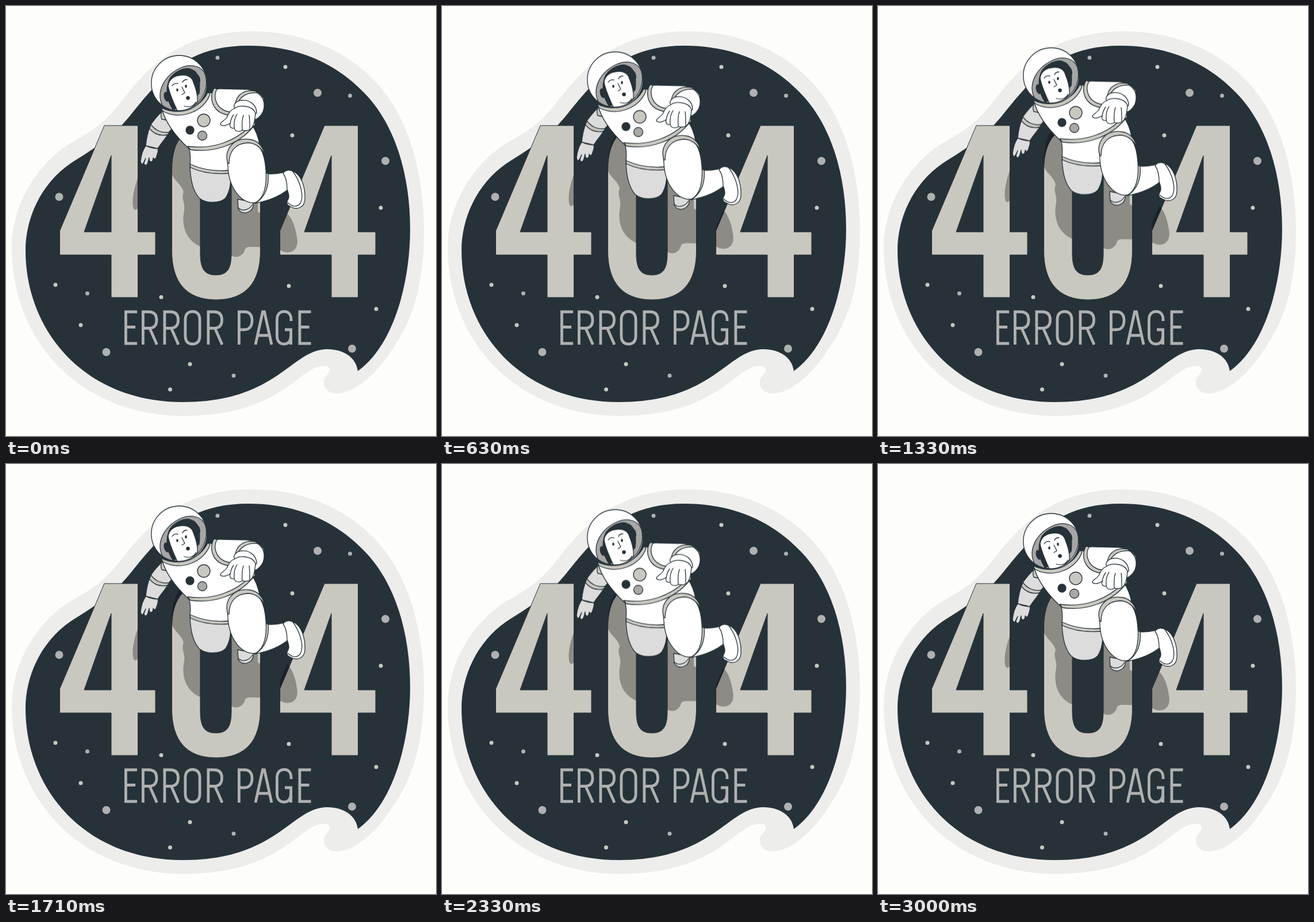
Animation, 748 px wide and 748 px high, one loop 3040 ms. Source, as an HTML page:

```html
<!DOCTYPE html>
<html lang="en">
<head>
<meta charset="utf-8">
<title>404 error page</title>
<style>
  html, body { margin: 0; width: 100%; height: 100%; overflow: hidden; background: #fdfef9; }
  svg { display: block; width: 100vw; height: 100vh; }
  .ink { fill: #263238; }
  .beige { fill: #c9c8c0; }
  .pale { fill: #dcdcdc; }
  .line { fill: none; }
  .stars { fill: none; stroke: #c9c8c0; stroke-width: 7; stroke-linecap: round; }
  .grey { stroke: #b0b0b0; }
  .big { stroke-width: 14; }
  .lettering { fill: none; stroke: #b0b0b0; stroke-width: 4.8; }
  .suit { fill: #fff; stroke: #263238; stroke-width: 1.3; stroke-linejoin: round; stroke-linecap: round; }
  /* 24 steps a second: 1.5 s up, 1.5 s down, then one held step */
  .float { animation: float 3040ms -8ms infinite steps(36); }
  @keyframes float {
    0%, 98.684%, 100% { transform: translateY(0); }
    49.342% { transform: translateY(-15px); }
  }
</style>
</head>
<body>
<svg viewBox="0 0 748 748">
  <defs>
    <path id="digits" fill-rule="evenodd" clip-rule="evenodd" d="
      M171 208H229.500V393H260V433H229.500V507H183V433H93.500V391ZM183 260L136 393H183Z
      M554 208H612.500V393H643V433H612.500V507H566V433H476.500V391ZM566 260L519 393H566Z
      M288.500 285C288.500 232 312 204 365 204S442.500 232 442.500 285V426C442.500 482 416 511 365.500 511S288.500 482 288.500 426Z
      M338 285V430C338 457 345 468 365 468S392 457 392 430V285C392 258 385 247 365 247S338 258 338 285Z"/>
    <clipPath id="onDigits"><use href="#digits"/></clipPath>
    <path id="E" d="M22 2H2.400V57H22M2.400 28.500H19"/>
    <path id="R" d="M2.400 59V2H12C22 2 26 7 26 16S22 30.500 12 30.500H2.400M14 30.500L26.500 59"/>
    <path id="O" d="M2.400 16C2.400 7 6.500 1.500 15 1.500S27.600 7 27.600 16V43C27.600 53 23.500 58 15 58S2.400 53 2.400 43Z"/>
    <path id="P" d="M2.400 59V2H12C21 2 25 8 25 17S21 33 12 33H2.400"/>
    <path id="A" d="M2.500 59L15 2H18L30.500 59M6.500 43H26.500"/>
    <path id="G" d="M27 18V16C27 7 23 1.500 15 1.500S2.400 7 2.400 16V43C2.400 53 7 58 14.500 58C23 58 26.600 52 26.600 42V33H16M26.600 40V59"/>
  </defs>

  <!-- backdrop -->
  <path fill="#ededec" d="M428 44C520 44 600 80 652 142C705 205 727 300 727 390C727 480 710 545 670 600C645 640 605 674 576 674C555 674 548 656 556 645C566 634 566 626 552 626C510 626 480 713 310 713C126 713 10 580 10 420C10 350 50 278 110 240C150 217 165 208 193 176C245 108 300 44 428 44Z"/>
  <path class="ink" d="M422 69C502 69 571 97 622 150C680 208 703 300 703 388C703 480 675 590 612 635C609 610 585 596 556 597C495 600 470 689 308 689C136 689 34 565 34 425C34 370 60 310 112 274C160 243 185 230 222 183C275 117 320 69 422 69Z"/>
  <path class="stars" d="M486 106h0M498 225h0M652 351h0M86 485h0M130 555h0M320 623h0M285.500 667h0M270 506.500h0M492 487h0M644 527h0"/>
  <path class="stars grey" d="M368 90h0M598.500 156h0M141.500 500h0M396 643h0"/>
  <path class="stars grey big" d="M542 151h0M660 269.500h0M92.500 332h0M174.500 602h0M602 596h0"/>

  <use href="#digits" class="beige" stroke="#263238"/>
  <g class="lettering" role="img" aria-label="ERROR PAGE" transform="translate(0 530)">
    <use href="#E" x="206"/><use href="#R" x="236"/><use href="#R" x="273.500"/>
    <use href="#O" x="309.500"/><use href="#R" x="349.500"/>
    <use href="#P" x="403"/><use href="#A" x="431.500"/><use href="#G" x="469"/><use href="#E" x="508.500"/>
  </g>

  <g class="float">
    <!-- shadow, cut to the digits at rest -->
    <path clip-path="url(#onDigits)" opacity=".3" d="
      M288 225V291C292 304 306 310 309 324C304 335 312 342 310 355C304 385 315 410 340 419L392 434C402 440 413 434 416 423C418 417 430 420 445 419V362L438 358V225Z
      M476 330V424C490 434 510 428 506.500 405C504 385 497 364 484 358Z
      M232 293C222 315 217 345 223 354C228 356 231 350 232 344Z"/>

    <g class="suit">
      <!-- far foot, arm and leg -->
      <path class="pale" d="M403 336L404 353C408 360 416 362 424 357C430 353 431 347 430 341Z"/>
      <path class="line" d="M404 351C411 358 423 355 429 345"/>
      <path class="pale" d="M276 180C268 186 259 196 252 206C246 220 244 232 243 243L264 248C270 238 280 228 284 219L294 207Z"/>
      <path class="pale" d="M243 243C238 250 235 260 234 270C235 276 238 277 240 271L243 265L240 273C241 279 245 278 247 272L249 264C249 268 250 271 252 271C255 271 256 268 256 264C258 267 260 267 261 264C263 258 266 252 264 248C257 248 249 246 243 243Z"/>
      <path class="beige" d="M252 206C260 217 272 222 285 219L281 224C268 227 257 222 249.500 213Z"/>
      <path class="beige" d="M274 177C269 186 269 193 271 197C278 197 286 202 291 208L294 204Z"/>
      <path class="pale" d="M320 279C321 300 324 320 336 334C348 344 372 344 382 334C390 322 392 305 390 288Z"/>

      <!-- torso -->
      <path d="M318 246C321 256 321 268 320 276C340 286 366 288 390 286L441 240C438 224 433 214 428 207Z"/>
      <path class="beige" d="M320 275C342 285 366 288 388 286L389 291C364 293 340 290 321 281Z"/>
      <path d="M271 178C276 198 290 222 318 248C360 252 405 236 433 207L432 170L352 150C340 172 300 192 271 178Z"/>
      <path class="beige" d="M316 244C358 250 400 236 427 206L430 210C404 242 360 256 321 250Z"/>
      <path class="beige" d="M270 177C300 192 338 178 351 150L355 153C345 184 302 200 273 183Z"/>
      <circle class="ink" cx="320" cy="216" r="7"/>
      <circle class="beige" cx="344" cy="199" r="11"/>
      <circle fill="#a8a8a5" cx="341.500" cy="225.500" r="8"/>

      <!-- near leg -->
      <path d="M448 292C464 292 478 292 486 288L492 318C480 328 462 338 434 343Z"/>
      <path class="beige" d="M451 291H456C458 312 452 332 434 343L428 342C445 330 453 312 451 291Z"/>
      <path d="M482 291C486 284 494 285 500 288C514 294 521 316 520 336C519 352 505 355 495 349C488 346 487 342 491 336C494 330 490 322 489 319C489 308 487 298 482 291Z"/>
      <path class="line" d="M499 288C512 305 519 330 512 343C506 351 498 349 490 342"/>
      <path d="M385 268C384 245 398 233 420 234C441 235 450 255 452 285C454 310 450 334 434 342C412 345 388 320 386 280Z"/>
      <path class="beige" d="M386 274C378 248 398 228 424 232C438 234 447 244 451 260C444 246 434 238 420 238C400 239 388 252 388 274Z"/>

      <!-- near arm -->
      <path d="M358 160C358 148 364 143 376 144L420 145C434 147 444 152 449 162L440 190H400C378 186 362 178 358 160Z"/>
      <path class="beige" d="M362 143C352 158 358 188 391 190L393 185C366 182 359 160 367 144Z"/>
      <path class="beige" d="M399 169C402 154 414 145 434 148L438 151C420 151 408 158 404 169Z"/>
      <path d="M403 169C408 157 420 150 437 151C448 158 452 170 447 184C443 192 438 196 433 198L430 182C420 176 410 176 400 180Z"/>
      <path d="M398 179C394 172 400 165 410 164C424 163 436 172 436 186L432 190Z"/>
      <path d="M398 178C405 172 428 172 434 186C433 200 430 212 424 215C418 218 412 216 412 216C404 220 398 218 397 212C392 214 388 210 390 204C384 208 376 210 373 206C372 202 380 200 384 194C388 184 392 180 398 178Z"/>
      <path class="line" d="M390 204C391 198 393 193 396 189M397 212C396 202 398 194 402 188M411 216C410 204 411 196 413 190M424 214C424 204 424 198 423 190"/>

      <!-- helmet and face -->
      <circle cx="301.300" cy="134.500" r="48.500"/>
      <path fill="#a6a6a6" d="M272 173C261 150 274 121 305 107C325 99 342 106 347 120C352 140 345 160 328 173C312 184 290 186 272 173Z"/>
      <path class="ink" d="M291 181C280 165 276 145 285 126C295 112 312 106 322 110C334 114 339 128 336 152L328 160Z"/>
      <ellipse class="ink" cx="279.500" cy="158" rx="4" ry="8" transform="rotate(-14 279.500 158)"/>
      <ellipse class="ink" cx="333" cy="127" rx="4" ry="8" transform="rotate(-14 333 127)"/>
      <path d="M298 182C290 165 284 150 282 139C283 128 292 122 300 121C312 118 322 122 325 130C330 142 334 155 333 166C328 176 312 183 298 182Z"/>
      <path class="line" d="M289 139C291 136 295 134 299 135M307 133C308 130 311 128 315 128M306 141L311 151L306 154M310 174C318 177 328 174 330 167"/>
      <g class="ink" stroke="none">
        <ellipse cx="298" cy="146" rx="1.800" ry="2.800"/>
        <ellipse cx="313" cy="139.500" rx="1.800" ry="2.800"/>
        <circle cx="316.500" cy="160" r="3.300"/>
      </g>
    </g>
  </g>
</svg>
</body>
</html>
```
